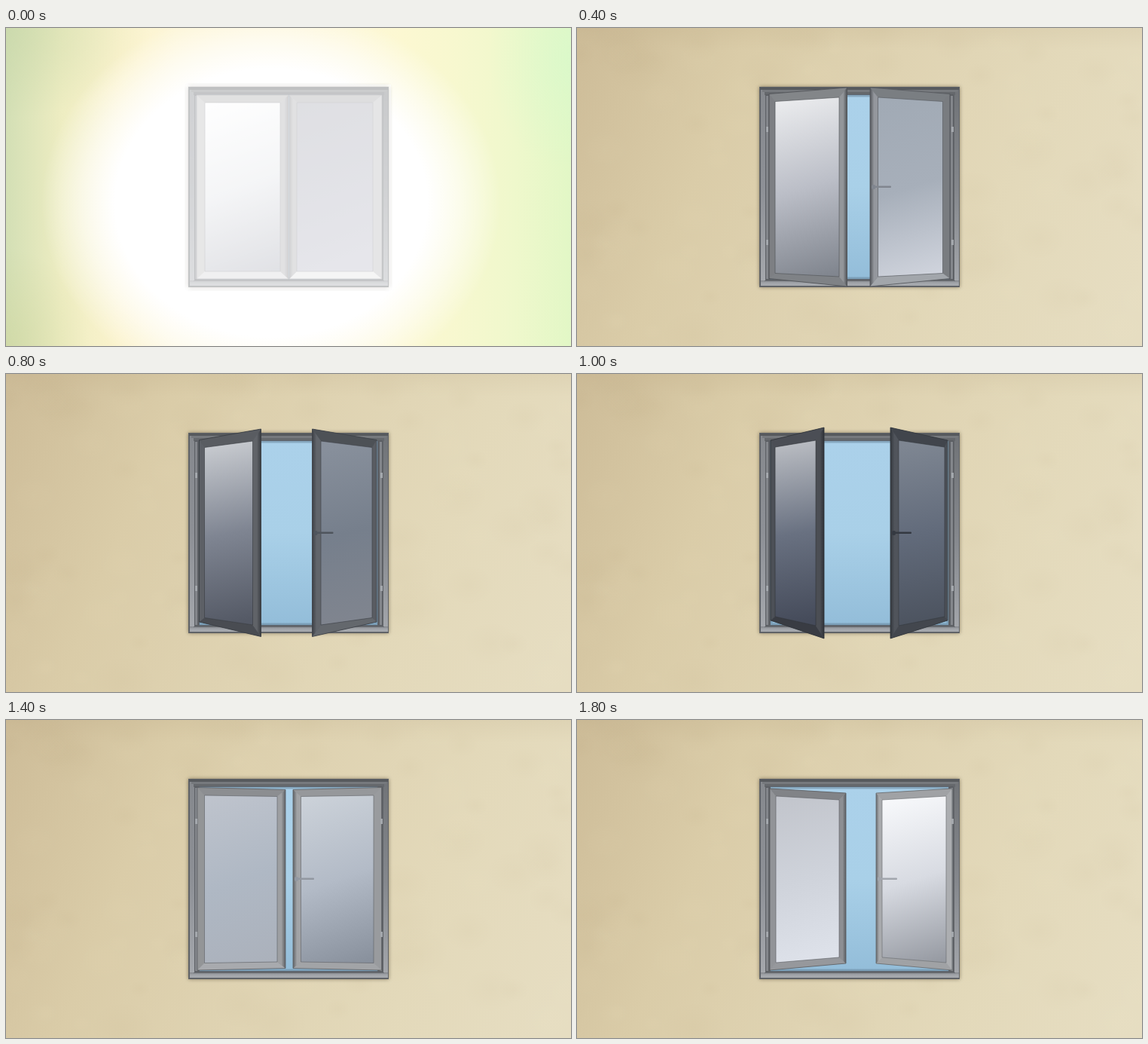
Write an HTML page with a canvas that moves like this. It is 750 px wide and 422 px high and loops after 2000 ms.

```html
<!DOCTYPE html>
<html lang="en">
<head>
<meta charset="utf-8">
<title>Window</title>
<style>
html, body { margin: 0; width: 100%; height: 100%; overflow: hidden; background: #dfd3b3; }
canvas { display: block; }
</style>
</head>
<body>
<canvas id="stage" width="750" height="422"></canvas>
<script>
const W = 750, H = 422, STEP = 200;
const stage = document.getElementById('stage');
const ctx = stage.getContext('2d');

// left/right: x of hinge, free edge, glass at hinge, glass at free edge
// edge/pane: y of top and bottom at the hinge, then at the free edge
// tones: top rail, hinge stile, free stile, bottom rail, outline
const closed = {
  left: [253, 375, 264, 364], right: [499, 376, 487, 386],
  edge: [89, 333, 89, 333], pane: [99, 323, 99, 323]
};
const flash = {
  ...closed,
  glassL: ['#ffffff', '#e4e6ea', '#afb1bb'], glassR: ['#abacb6', '#b4b5c1', '#c0c0cd'],
  tonesL: ['#b0b0b0', '#c0c0c1', '#b0b0b3', '#d8d8da', '#88888c'],
  tonesR: ['#a8a8ab', '#bcbcbf', '#b0b0b3', '#e5e5e6', '#88888c'],
  handle: '#b4b5bc'
};
const ajar = {
  left: [254, 368, 262, 358], right: [498, 381, 487, 390],
  edge: [88, 334, 83, 340], pane: [97, 326, 94, 328],
  glassL: ['#ffffff', '#e0e3eb', '#9da2ad'], glassR: ['#afbac5', '#c4ccd7', '#edf1fa'],
  tonesL: ['#a0a2a5', '#8d8e91', '#b2b4b8', '#a5a7ab', '#5d6064'],
  tonesR: ['#9b9fa4', '#8c8f94', '#b6b9bf', '#bfc3ca', '#62656a'],
  handle: '#989ca5'
};
const half = {
  left: [256, 349, 264, 338], right: [492, 397, 484, 409],
  edge: [87, 331, 75, 346], pane: [98, 325, 90, 332],
  glassL: ['#d6d9dd', '#9599a2', '#62676f'], glassR: ['#929aa5', '#8a929d', '#b3b7bf'],
  tonesL: ['#66696d', '#6d7074', '#74777b', '#595c60', '#404348'],
  tonesR: ['#595c60', '#65686c', '#72757a', '#85888c', '#46494e'],
  handle: '#6a7078'
};
const wide = {
  left: [257, 328, 263, 317], right: [492, 416, 488, 427],
  edge: [88, 327, 71, 351], pane: [97, 322, 88, 334],
  glassL: ['#b8bbc1', '#697181', '#454b5a'], glassR: ['#7e8692', '#626b7b', '#4c535f'],
  tonesL: ['#4b4e55', '#4c5057', '#4b4e54', '#393c43', '#2f3238'],
  tonesR: ['#41454c', '#4c5057', '#50545b', '#43474e', '#33373d'],
  handle: '#343941'
};
const shut = {
  ...closed,
  glassL: ['#c0c5cc', '#8a97a7', '#6c747f'], glassR: ['#9ba7b5', '#8693a4', '#757e8a'],
  tonesL: ['#7e8083', '#87888b', '#85878a', '#9c9ea2', '#505357'],
  tonesR: ['#787a7d', '#85878a', '#85878a', '#8f9195', '#505357'],
  handle: '#7f8792'
};
const tilted = {
  left: [255, 367, 263, 356], right: [498, 386, 489, 397],
  edge: [90, 331, 96, 326], pane: [101, 322, 104, 319],
  glassL: ['#bdc3cd', '#d3d8e1', '#e9edf7'], glassR: ['#ffffff', '#e0e3ea', '#979ea9'],
  tonesL: ['#999b9e', '#9fa1a3', '#b4b6b9', '#b4b6b9', '#6a6d71'],
  tonesR: ['#b4b6b9', '#adafb2', '#bcbec1', '#b4b6b9', '#6d7074'],
  handle: '#a4a8b0'
};
const inward = {
  left: [256, 357, 264, 348], right: [498, 397, 490, 405],
  edge: [91, 332, 97, 323], pane: [101, 322, 106, 315],
  glassL: ['#c1c4cb', '#cfd3db', '#e0e4ec'], glassR: ['#fafbfd', '#d8dbe2', '#92969e'],
  tonesL: ['#818387', '#929498', '#8d8f93', '#96989c', '#5a5d61'],
  tonesR: ['#a0a2a5', '#acaeb1', '#a8aaad', '#a0a2a5', '#66696d'],
  handle: '#a2a6ad'
};

function between(a, b) {
  if (typeof a === 'number') return (a + b) / 2;
  if (Array.isArray(a)) return a.map((v, i) => between(v, b[i]));
  if (typeof a === 'string') {
    const part = (c, i) => parseInt(c.substr(1 + 2 * i, 2), 16);
    return `rgb(${[0, 1, 2].map(i => Math.round((part(a, i) + part(b, i)) / 2))})`;
  }
  return Object.fromEntries(Object.keys(a).map(k => [k, between(a[k], b[k])]));
}

const poses = [
  flash, ajar, between(ajar, half), half, between(half, wide), wide,
  shut, between(shut, tilted), tilted, inward
];

function gradient(g, x0, y0, x1, y1, colors) {
  const fill = g.createLinearGradient(x0, y0, x1, y1);
  colors.forEach((c, i) => fill.addColorStop(i / (colors.length - 1), c));
  return fill;
}

function box(color, x, y, w, h) {
  ctx.fillStyle = color;
  ctx.fillRect(x, y, w, h);
}

function shape(points, fill, stroke, alpha = 1) {
  ctx.beginPath();
  points.forEach(p => ctx.lineTo(...p));
  ctx.closePath();
  if (fill) { ctx.fillStyle = fill; ctx.fill(); }
  if (stroke) {
    ctx.globalAlpha = alpha;
    ctx.strokeStyle = stroke;
    ctx.lineWidth = 1;
    ctx.stroke();
    ctx.globalAlpha = 1;
  }
}

function layer(paint) {
  const c = document.createElement('canvas');
  c.width = W;
  c.height = H;
  paint(c.getContext('2d'));
  return c;
}

function blob(g, x, y, rx, ry, stops) {
  g.save();
  g.translate(x, y);
  g.scale(rx, ry);
  const fill = g.createRadialGradient(0, 0, 0, 0, 0, 1);
  stops.forEach(([at, c]) => fill.addColorStop(at, c));
  g.fillStyle = fill;
  g.fillRect(-1, -1, 2, 2);
  g.restore();
}

const wall = layer(g => {
  g.fillStyle = gradient(g, 0, 40, W, 330, ['#cebd99', '#dacca8', '#dfd3b2', '#e3d9ba', '#e6ddc1']);
  g.fillRect(0, 0, W, H);
  let seed = 17;
  const random = () => (seed = seed * 16807 % 2147483647) / 2147483647;
  for (let i = 0; i < 110; i++) {
    const tint = i % 2 ? '255,245,210' : '150,125,80';
    const r = 14 + random() * 30;
    blob(g, random() * W, random() * H, r, r * 0.8,
      [[0, `rgba(${tint},.03)`], [1, `rgba(${tint},0)`]]);
  }
  g.fillStyle = gradient(g, 0, 0, 0, 30, ['rgba(140,115,75,.07)', 'rgba(140,115,75,0)']);
  g.fillRect(0, 0, W, 30);
});

const glow = layer(g => {
  g.fillStyle = gradient(g, 0, 0, W, 0, ['#d3dfb5', '#eeedc2', '#fbf3cd', '#fdf6d8', '#fdf6d8',
    '#fdf6d8', '#fdf7d6', '#fcf8d2', '#f7f8cf', '#eff8cc', '#e2f7c6']);
  g.fillRect(0, 0, W, H);
  blob(g, 0, 0, 190, 120, [[0, 'rgba(195,212,165,.5)'], [1, 'rgba(195,212,165,0)']]);
  blob(g, 0, 422, 110, 130, [[0, 'rgba(205,212,155,.5)'], [1, 'rgba(205,212,155,0)']]);
  blob(g, 750, 40, 110, 150, [[0, 'rgba(214,250,204,.6)'], [1, 'rgba(214,250,204,0)']]);
  blob(g, 352, 232, 305, 262,
    [[0, '#fff'], [0.68, '#fff'], [0.82, 'rgba(255,255,255,.6)'], [1, 'rgba(255,255,255,0)']]);
});

function frame() {
  ctx.save();
  ctx.shadowColor = 'rgba(60,50,30,.55)';
  ctx.shadowBlur = 5;
  box('#606367', 242, 78, 266, 266);
  ctx.restore();
  box(gradient(ctx, 0, 79, 0, 343, ['#85888d', '#8d9096', '#a6a9ae']), 244, 80, 6, 262);
  box(gradient(ctx, 0, 79, 0, 343, ['#707377', '#84878c', '#a4a7ac']), 501, 80, 6, 262);
  box('#56595d', 243, 79, 264, 3);
  box('#76797d', 246, 82, 259, 3);
  box('#65686c', 249, 85, 253, 4);
  box(gradient(ctx, 0, 334, 0, 343, ['#7b7e83', '#a2a5aa', '#a9acb1']), 244, 335, 263, 7);
  box('#696c71', 249, 335, 253, 1);
  box('#5c5f64', 250, 88, 250, 246);
  box('#83868b', 251, 90, 3, 243);
  box('#83868b', 496, 90, 3, 243);
  box(gradient(ctx, 0, 89, 0, 333, ['#abd1ea', '#a9d0e8', '#93bdd9']), 257, 89, 236, 244);
  ctx.strokeStyle = 'rgba(100,130,152,.5)';
  ctx.lineWidth = 3;
  ctx.strokeRect(258, 90, 234, 242);
}

function sash([hinge, free, paneHinge, paneFree], edge, pane, glass, tones) {
  const [top, hingeTone, freeTone, bottom, line] = tones;
  const A = [hinge, edge[0]], B = [free, edge[2]], C = [free, edge[3]], D = [hinge, edge[1]];
  const a = [paneHinge, pane[0]], b = [paneFree, pane[2]],
        c = [paneFree, pane[3]], d = [paneHinge, pane[1]];
  shape([A, B, C, D], hingeTone);
  shape([A, B, b, a], top);
  shape([D, C, c, d], bottom);
  shape([B, C, c, b], gradient(ctx, paneFree, 0, free, 0, [freeTone, freeTone, line]));
  shape([A, B, C, D], null, line, 0.8);
  const x0 = Math.min(paneHinge, paneFree), x1 = Math.max(paneHinge, paneFree);
  shape([a, b, c, d], gradient(ctx, x0 + 8, 95, x1 - 8, 328, glass), line, 0.6);
}

function handle(x, color) {
  ctx.fillStyle = color;
  ctx.beginPath();
  ctx.roundRect(x + 2, 208, 5, 6, 2);
  ctx.roundRect(x + 4, 209.5, 24, 2.5, 1);
  ctx.fill();
}

function draw(step) {
  const p = poses[step], bright = p === flash;
  ctx.drawImage(bright ? glow : wall, 0, 0);
  frame();
  sash(p.left, p.edge, p.pane, p.glassL, p.tonesL);
  sash(p.right, p.edge, p.pane, p.glassR, p.tonesR);
  if (bright) {
    box('rgba(255,255,255,.62)', 239, 75, 272, 272);
  } else {
    handle(p.right[1], p.handle);
    for (const y of [131, 281]) {
      box('#a4a8ad', 251, y, 3, 7);
      box('#a4a8ad', 497, y, 3, 7);
    }
  }
  // Soften the edges like footage.
  ctx.filter = 'blur(0.7px)';
  ctx.drawImage(stage, 0, 0);
  ctx.filter = 'none';
}

function tick(now) {
  draw(Math.floor(now / STEP) % poses.length);
  requestAnimationFrame(tick);
}
draw(0);
requestAnimationFrame(tick);
</script>
</body>
</html>
```
